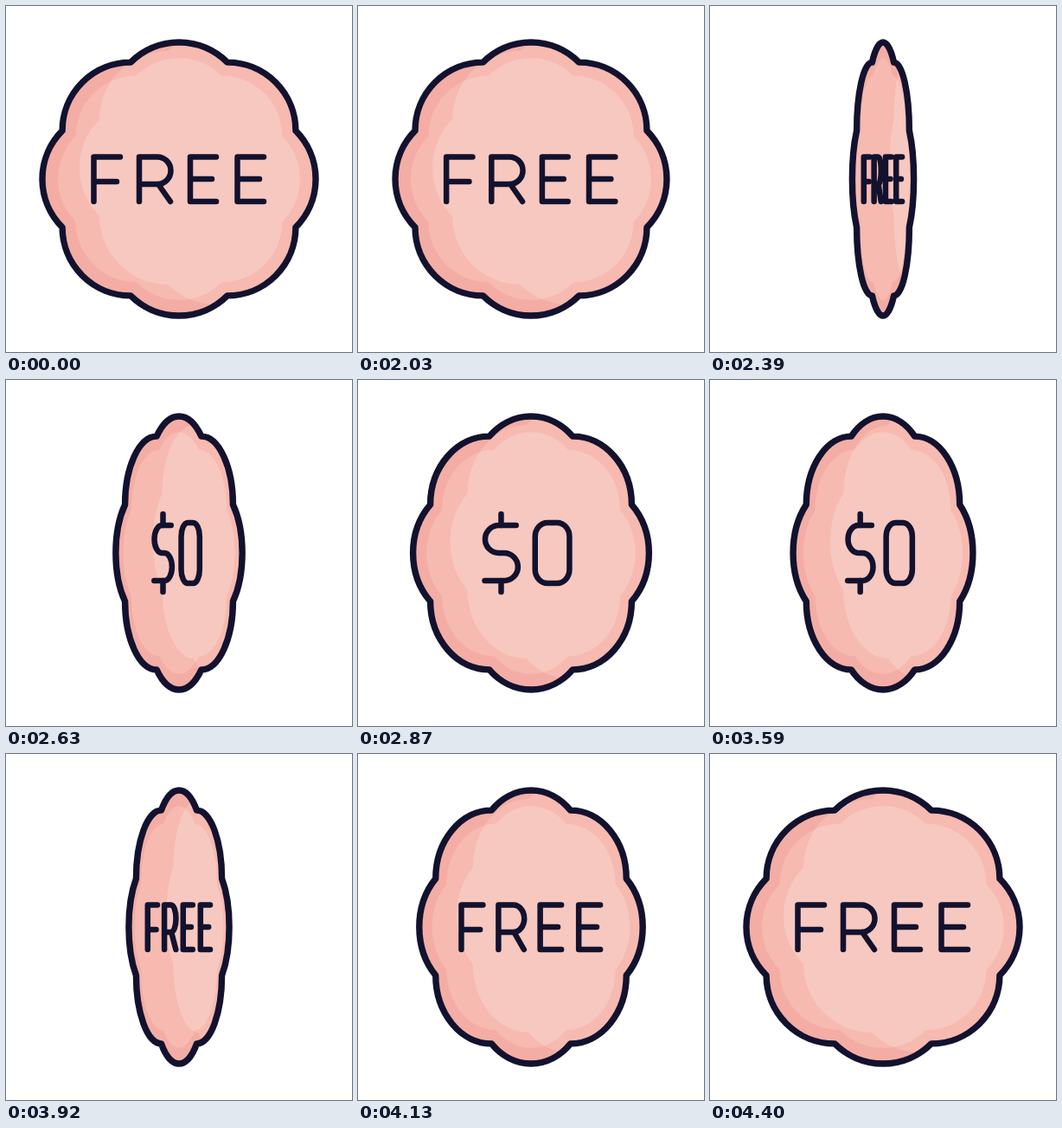
Animation of 400x400 px, one loop 4430 ms. Source, as an HTML page:

```html
<!DOCTYPE html>
<html lang="en">
<head>
<meta charset="utf-8">
<title>Free badge</title>
<style>
  html, body { margin: 0; width: 100%; height: 100%; overflow: hidden; background: #fff; }
  svg { display: block; width: 100vw; height: 100vh; }
  .line {
    fill: none; stroke: #12122f; stroke-width: 6.5;
    stroke-linecap: round; stroke-linejoin: round;
  }
  .line, .line path { vector-effect: non-scaling-stroke; }
  .rim { stroke-width: 7.4; }
</style>
</head>
<body>
<svg viewBox="-200 -200 400 400" role="img" aria-label="FREE, $0">
  <defs>
    <clipPath id="lit"><path id="light" class="outer"/></clipPath>
  </defs>
  <g class="spin"><path class="outer" fill="#f4ada4"/></g>
  <g clip-path="url(#lit)"><g class="spin"><path class="outer" fill="#f6bab1"/></g></g>
  <g class="spin"><path class="inner" fill="#f6bab1"/></g>
  <g clip-path="url(#lit)"><g class="spin"><path class="inner" fill="#f7c8c0"/></g></g>
  <g class="spin">
    <path class="outer line rim"/>
    <g id="free" class="line">
      <path d="M-98.5 26V-25.5H-68M-98.5 3H-72"/>
      <path d="M-46 26V-25.5H-25A15.5 15.75 0 0 1 -25 6H-46M-24 6L-10 26"/>
      <path d="M43 -25.5H13V26H43M13 0H38"/>
      <path d="M98 -25.5H67.5V26H98M67.5 0H93"/>
    </g>
    <g id="zero" class="line">
      <path d="M-20 -32H-43A18.5 16 0 0 0 -43 0H-36A18.5 16 0 0 1 -36 32H-62"/>
      <path d="M-40 -45V-32M-40 32V45"/>
      <path d="M22 -35H35A16.5 16 0 0 1 51.5 -19V19A16.5 16 0 0 1 35 35H22A16.5 16 0 0 1 5.5 19V-19A16.5 16 0 0 1 22 -35Z"/>
    </g>
  </g>
</svg>
<script>
const LOOP = 4430, START = 2030, STEP = 30, TURN = 3370, END = 4400;
const $ = id => document.getElementById(id);
const all = sel => [...document.querySelectorAll(sel)];
const spins = all('.spin');

// Eight arcs between notches; k scales the whole shape.
function flower(k) {
  const pts = Array.from({ length: 8 }, (_, i) => {
    const a = (i + 0.5) * Math.PI / 4;
    return `${146 * k * Math.cos(a)} ${146 * k * Math.sin(a)}`;
  });
  const r = 79 * k;
  return `M${pts[7]}` + pts.map(p => `A${r} ${r} 0 0 1 ${p}`).join('') + 'Z';
}

// Turn in units of half a revolution.
function turn(t) {
  if (t < START || t >= END) return 0;
  if (t < TURN) return Math.sin(Math.PI / 2 * (t - 1997) / 1397);
  const f = (t - TURN) / (END - TURN);
  return 1 + f + 0.345 * f * (1 - f);
}

function draw(ms) {
  let t = ms % LOOP;
  if (t > START) t = START + Math.floor((t - START) / STEP) * STEP;
  const c = Math.cos(turn(t) * Math.PI);
  const s = Math.max(Math.abs(c), 0.002);
  spins.forEach(g => g.setAttribute('transform', `scale(${s} 1)`));
  $('light').setAttribute('transform', `translate(43 -13) scale(${s} 1)`);
  $('free').style.display = c >= 0 ? '' : 'none';
  $('zero').style.display = c < 0 ? '' : 'none';
}

all('.outer').forEach(p => p.setAttribute('d', flower(1)));
all('.inner').forEach(p => p.setAttribute('d', flower(0.885)));

const begin = performance.now();
function tick() {
  draw(performance.now() - begin);
  requestAnimationFrame(tick);
}
draw(0);
requestAnimationFrame(tick);
</script>
</body>
</html>
```
